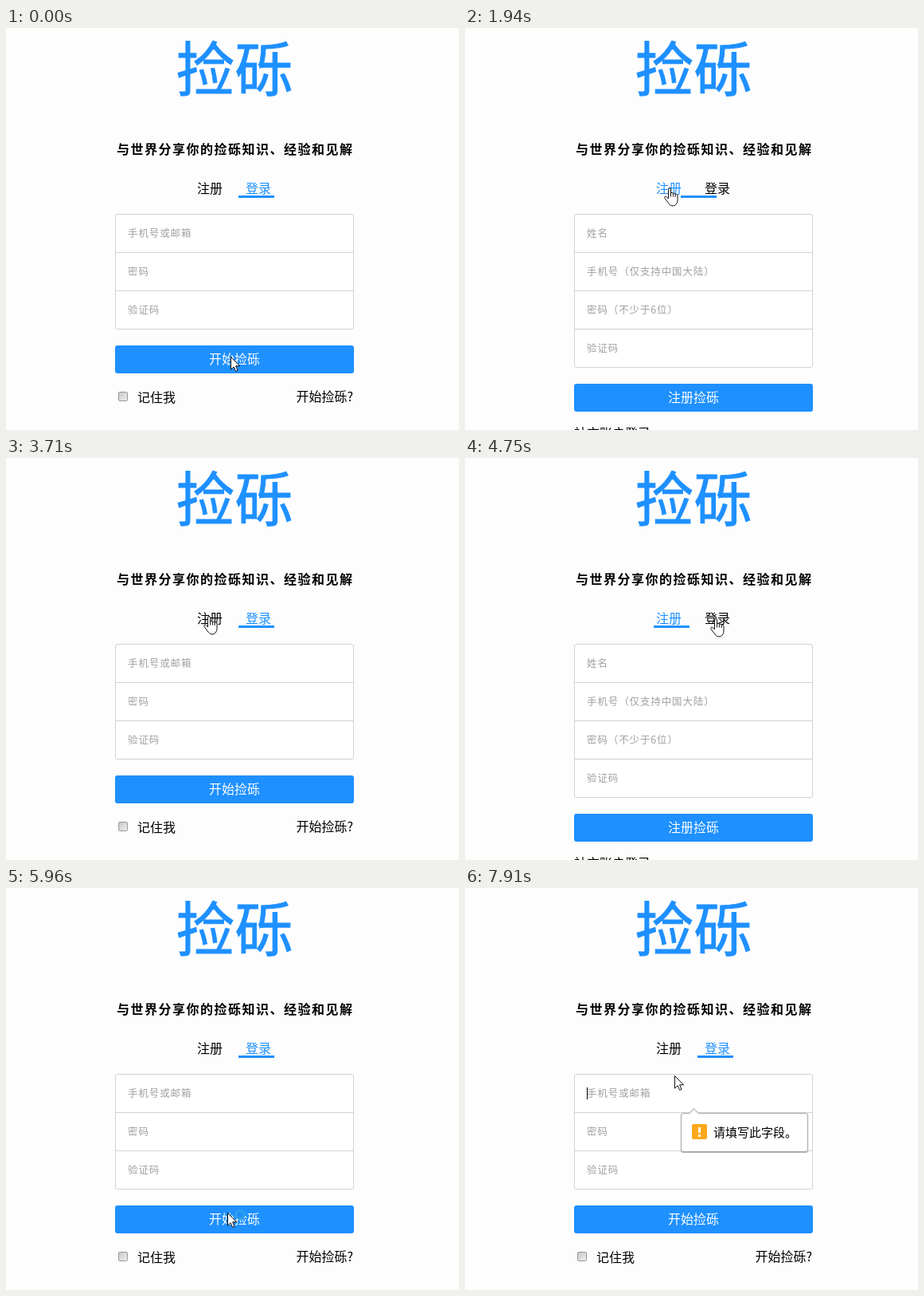
Animation, 569 px wide and 504 px high, one loop 8 s. Source, as an HTML page:

```html
<!DOCTYPE html>
<html lang="zh-CN">
<head>
<meta charset="utf-8">
<title>登录</title>
<style>
html, body { margin: 0; width: 100%; height: 100%; overflow: hidden; }
body { position: relative; background: #fdfdfd; color: #000; font: 16px/20px "Noto Sans CJK SC", "Noto Sans CJK", sans-serif; }
body *, body *::before { box-sizing: border-box; }
.abs, .panel, .tab, .form, .btn, #line, #caret, #tip, #cursor, #cursor svg { position: absolute; white-space: nowrap; }
h1, h2 { margin: 0; }
h1 { left: 214px; top: 11px; font-size: 73.5px; line-height: 73px; font-weight: 400; color: #1e90ff; -webkit-text-stroke: 1px #1e90ff; }
h2 { left: 139px; top: 141px; font-size: 16px; font-weight: 700; letter-spacing: 1.5px; }

.panel { inset: 0; }
.tab { top: 190px; }
.tab.on { color: #1e90ff; }
.sign { left: 240px; }
.log { left: 301px; }
.form { left: 137px; top: 233px; width: 300px; border: 1px solid #d2d2d2; border-radius: 3px; background: #fff; }
.form div { height: 48px; padding-left: 15px; line-height: 46px; font-size: 12.5px; letter-spacing: .88px; color: #a0a0a0; border-bottom: 1px solid #d2d2d2; }
.form div:last-child { height: 47px; border: 0; }
.btn { left: 137px; width: 300px; height: 35px; line-height: 33px; border-radius: 3px; background: #1e90ff; color: #fff; text-align: center; }
.check { left: 141px; top: 456px; width: 12px; height: 12px; border: 1px solid #999; border-radius: 2px; background: linear-gradient(135deg, #c8c8c8, #eee); }

#line { left: 0; top: 210px; width: 45px; height: 3px; background: #1e90ff; }
#caret { left: 153px; top: 250px; width: 1px; height: 15px; background: #000; }
#tip { left: 271px; top: 282px; width: 160px; height: 49px; border: 1px solid #a9a9a9; border-radius: 3px; background: #fff; box-shadow: 0 1px 1px #0005; font-size: 15px; }
#tip::before { content: ""; position: absolute; left: 11px; top: -5px; width: 9px; height: 9px; background: #fff; border: solid #a9a9a9; border-width: 1px 0 0 1px; transform: rotate(45deg); }
#tip svg { position: absolute; left: 13px; top: 13px; }
#tip span { position: absolute; left: 40px; top: 13px; }
#cursor { left: 0; top: 0; }
#cursor svg { left: 0; top: 0; overflow: visible; fill: #fff; stroke: #111; stroke-linejoin: round; }

/* one loop is 8 s, so 1% is 80 ms */
.login, .join, #line, #caret, #tip, #press, #cursor, #cursor svg, #ring { animation: 8s step-end infinite; }
.login { animation-name: login; }
.join { animation-name: join; }
#line { animation-name: slide; }
#caret { animation-name: blink; }
#tip { animation-name: tip; }
#press { animation-name: press; }
#cursor { animation-name: move; }
#cursor #arrow { animation-name: arrow; }
#cursor #hand { animation-name: hand; }
#cursor #beam { animation-name: beam; }
#cursor #ring { animation-name: ring; }

@keyframes login {
  0%, 38.5%, 64.75% { visibility: visible; }
  24.25%, 51.375% { visibility: hidden; }
}
@keyframes join {
  0%, 38.5%, 64.75% { visibility: hidden; }
  24.25%, 51.375% { visibility: visible; }
}
@keyframes slide {
  0%, 40.25%, 66.375% { transform: translateX(292px); }
  24.25%, 51.375% { transform: translateX(271px); }
  25.75%, 53.125% { transform: translateX(237px); }
  38.5%, 64.75% { transform: translateX(258px); }
}
@keyframes blink {
  0%, 89.375% { opacity: 0; }
  82.75%, 95.875% { opacity: 1; }
}
@keyframes tip {
  0% { opacity: 0; }
  82.75% { opacity: .3; }
  84.375% { opacity: .8; }
  86.25%, 100% { opacity: 1; }
}
@keyframes press {
  0%, 82.75% { outline: 0 solid #4d90fe; }
  80.875% { outline: 1px solid #4d90fe; }
}
@keyframes move {
  0% { transform: translate(282px, 412px); }
  6.25% { transform: translate(277px, 355px); }
  7.75% { transform: translate(271px, 280px); }
  9.25% { transform: translate(267px, 236px); }
  12.375% { transform: translate(265px, 229px); }
  13.875% { transform: translate(257px, 210px); }
  15.5% { transform: translate(251px, 204px); }
  17% { transform: translate(251px, 201px); }
  22.5% { transform: translate(250px, 200px); }
  30.75% { transform: translate(262px, 203px); }
  32.25% { transform: translate(290px, 206px); }
  33.875% { transform: translate(300px, 205px); }
  40.25% { transform: translate(298px, 205px); }
  41.75% { transform: translate(280px, 203px); }
  43.25% { transform: translate(255px, 197px); }
  44.875% { transform: translate(242px, 195px); }
  46.375% { transform: translate(248px, 198px); }
  54.875% { transform: translate(258px, 199px); }
  56.375% { transform: translate(280px, 200px); }
  57.875% { transform: translate(300px, 202px); }
  59.375% { transform: translate(308px, 201px); }
  69.5% { transform: translate(298px, 270px); }
  71% { transform: translate(286px, 341px); }
  74.5% { transform: translate(278px, 407px); }
  76.25% { transform: translate(278px, 411px); }
  77.75% { transform: translate(277px, 421px); }
  90.875% { transform: translate(276px, 380px); }
  92.375% { transform: translate(273px, 322px); }
  97.375% { transform: translate(267px, 272px); }
  98.875%, 100% { transform: translate(263px, 235px); }
}
@keyframes arrow {
  0%, 9.25%, 74.5% { visibility: visible; }
  6.25%, 15.5% { visibility: hidden; }
}
@keyframes hand {
  0%, 69.5% { visibility: hidden; }
  15.5% { visibility: visible; }
}
@keyframes beam {
  0%, 9.25%, 74.5% { visibility: hidden; }
  6.25%, 69.5% { visibility: visible; }
}
@keyframes ring {
  0%, 76.25% { visibility: hidden; }
  74.5% { visibility: visible; }
}
</style>
</head>
<body>
<h1 class="abs">捡砾</h1>
<h2 class="abs">与世界分享你的捡砾知识、经验和见解</h2>

<div class="panel login">
  <span class="tab sign">注册</span><span class="tab log on">登录</span>
  <div class="form"><div>手机号或邮箱</div><div>密码</div><div>验证码</div></div>
  <div class="btn" id="press" style="top:398px">开始捡砾</div>
  <i class="abs check"></i>
  <span class="abs" style="left:165px;top:452px">记住我</span>
  <span class="abs" style="left:364.5px;top:451px">开始捡砾?</span>
</div>

<div class="panel join">
  <span class="tab sign on">注册</span><span class="tab log">登录</span>
  <div class="form"><div>姓名</div><div>手机号（仅支持中国大陆）</div><div>密码（不少于6位）</div><div>验证码</div></div>
  <div class="btn" style="top:446px">注册捡砾</div>
  <span class="abs" style="left:137px;top:497px">社交账户登录</span>
</div>

<i id="line"></i>
<i id="caret"></i>
<div id="tip">
  <svg width="19" height="19"><rect width="19" height="19" rx="2" fill="#fba81c"/><path d="M8 4h3v7h-3zM8 13h3v3h-3z" fill="#fff"/></svg>
  <span>请填写此字段。</span>
</div>

<div id="cursor">
  <svg id="arrow" width="24" height="24">
    <path d="M.5.5V16.2L4.1 12.8 6.6 18.4 9 17.4 6.6 11.8H11.6Z"/>
    <circle id="ring" cx="16" cy="2.5" r="5" fill="#1e90ff" stroke="#2f9fe8" stroke-width="3"/>
  </svg>
  <svg id="hand" width="18" height="24">
    <path d="M5.5 14V2.2Q5.5.5 7 .5T8.5 2.2V7.2Q8.7 6.2 10 6.3T11.4 7.8Q11.7 6.9 12.9 7.1T14.1 8.7Q14.5 8 15.7 8.3T17 10V16Q17 19 15.2 21 13.8 23 11 23 8 23 6.6 20.8L1.2 13.8Q.2 12.2 1.2 11.4T3.6 12Z"/>
    <path d="M8.5 7.2V11.5M11.4 7.8V11.5M14.1 8.7V12" fill="none"/>
  </svg>
  <svg id="beam" width="7" height="16">
    <path d="M0 .5H3M4 .5H7M3.5 1V15M0 15.5H3M4 15.5H7" fill="none"/>
  </svg>
</div>
</body>
</html>
```
